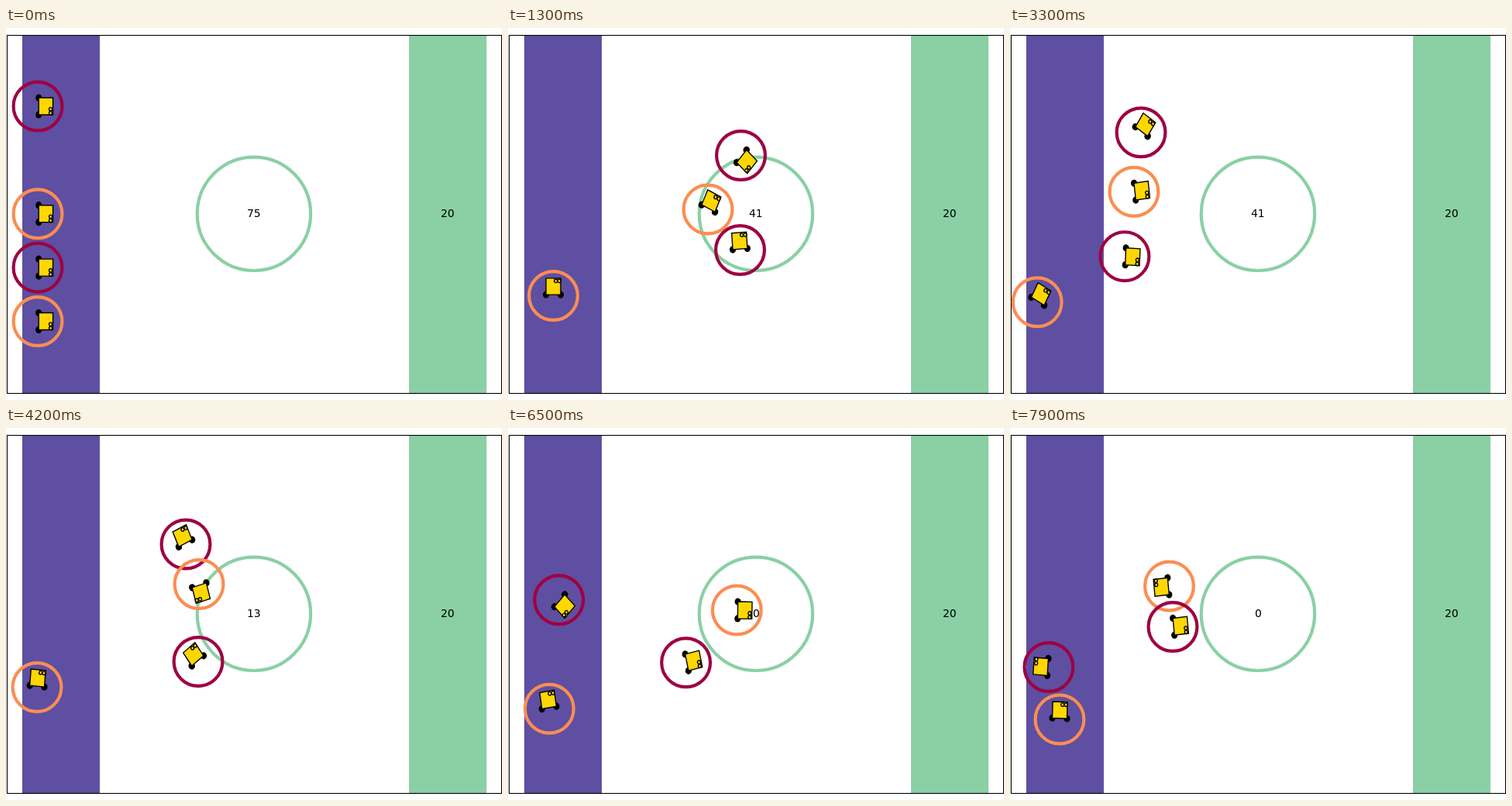
An HTML page that plays this animation: 640x480 px, repeating every 8 s.

```html
<!DOCTYPE html>
<html lang="en">
<head>
<meta charset="utf-8">
<title>Robot foraging</title>
<style>
  html, body { margin: 0; width: 100%; height: 100%; overflow: hidden; background: #fff; }
  svg { display: block; width: 640px; height: 480px; }
  text { font: 13.89px "DejaVu Sans", sans-serif; }
  .robot * { stroke: #000; stroke-width: 1.39; vector-effect: non-scaling-stroke; }
  .ring { fill: none; stroke-width: 4.17; }
</style>
</head>
<body>
<svg viewBox="0 0 640 480">
  <rect x="21" y="9.5" width="100" height="462" fill="#5e4fa2"/>
  <rect x="520" y="9.5" width="100" height="462" fill="#8ad0a4"/>
  <rect x="1.5" y="9.5" width="638" height="462" fill="none" stroke="#000" stroke-width="1.1"/>
  <circle class="ring" cx="319.9" cy="239.8" r="73.2" stroke="#8ad0a4"/>
  <g id="robots"></g>
  <g id="rings"></g>
  <text id="stock" y="244"></text>
  <text id="goal" y="244"></text>
</svg>
<script>
const LOOP = 8000, STEP = 100;
const SCALE_X = 199.5, SCALE_Y = 231;       // pixels per metre
const TURN_MS = 350, SHUFFLE_METRES = 0.42;
const CRIMSON = '#9e0142', ORANGE = '#fc8d52';

// Key poses: [time, x, y, heading in degrees clockwise from +x]
const robots = [
  { color: CRIMSON, stops: [
    [0, 41, 101, 0], [1300, 300.5, 164.5, 42], [2400, 126.5, 232, 162], [3600, 192, 109, -25],
    [4200, 232, 150, -115], [5500, 78, 184, 182], [6500, 65.7, 221.8, 44], [7900, 50, 308.5, 184]] },
  { color: ORANGE, stops: [
    [0, 41, 239.7, 0], [1300, 258, 234, -65], [2400, 74.5, 226, -159], [4200, 249, 201.5, 74],
    [5100, 115, 237, 165], [5500, 153.5, 237, 0], [6500, 295.3, 235, 1], [7900, 205.5, 204, 174]] },
  { color: CRIMSON, stops: [
    [0, 41, 309.1, 0], [1300, 299.5, 286.5, -94], [2400, 58, 291, 180], [4200, 248, 301.5, -127],
    [5150, 82, 300, -170], [5500, 90.3, 299, -8], [6500, 229.6, 302.8, -13], [7900, 210, 256.5, -6]] },
  { color: ORANGE, stops: [
    [0, 41, 378.5, 0], [1300, 58.5, 345.5, -90], [2400, 32, 366, -38], [4200, 40, 334.5, -85],
    [5500, 57.5, 326, -150], [6500, 53.3, 362.2, -99], [7900, 64, 376, -88]] }
];
const stockLevels = [[0, 75], [1100, 41], [3900, 13], [6500, 0]];

const byId = id => document.getElementById(id);
const smooth = u => u <= 0 ? 0 : u >= 1 ? 1 : u * u * (3 - 2 * u);
const nearestAngle = (angle, from) => angle - 360 * Math.round((angle - from) / 360);

function add(parent, tag, attrs) {
  const el = document.createElementNS('http://www.w3.org/2000/svg', tag);
  for (const key in attrs) el.setAttribute(key, attrs[key]);
  return parent.appendChild(el);
}

// Robot body in metres, facing +x
function buildRobot(robot) {
  robot.body = add(byId('robots'), 'g', { class: 'robot' });
  for (const side of [-1, 1])
    add(robot.body, 'circle', { cx: .006, cy: side * .0475, r: .017, fill: '#000' });
  add(robot.body, 'rect', { x: .006, y: -.0475, width: .092, height: .095, fill: '#ffd700' });
  for (const cy of [.016, .038])
    add(robot.body, 'circle', { cx: .083, cy, r: .01, fill: '#ffd700' });
  robot.ring = add(byId('rings'), 'circle', { class: 'ring', r: 31.4, stroke: robot.color });
}

// Wheels only roll along the heading, so project the mean velocity onto it
function velocity(stops, i) {
  const a = stops[Math.max(i - 1, 0)], b = stops[Math.min(i + 1, stops.length - 1)];
  const angle = stops[i][3] * Math.PI / 180, cos = Math.cos(angle), sin = Math.sin(angle);
  const speed = ((b[1] - a[1]) / SCALE_X * cos + (b[2] - a[2]) / SCALE_Y * sin) / (b[0] - a[0]);
  return [speed * cos * SCALE_X, speed * sin * SCALE_Y];
}

// Short moves blend the headings; long ones turn, face the way they go, and turn again
function headingAt(a, b, t) {
  const dx = (b[1] - a[1]) / SCALE_X, dy = (b[2] - a[2]) / SCALE_Y;
  if (Math.hypot(dx, dy) < SHUFFLE_METRES)
    return a[3] + (nearestAngle(b[3], a[3]) - a[3]) * smooth((t - a[0]) / (b[0] - a[0]));
  const cruise = nearestAngle(Math.atan2(dy, dx) * 180 / Math.PI, a[3]);
  return a[3] + (cruise - a[3]) * smooth((t - a[0]) / TURN_MS)
    + (nearestAngle(b[3], cruise) - cruise) * smooth(1 - (b[0] - t) / TURN_MS);
}

function poseAt(stops, t) {
  const next = Math.max(1, stops.findIndex(stop => stop[0] >= t));
  const a = stops[next - 1], b = stops[next], span = b[0] - a[0], u = (t - a[0]) / span;
  const va = velocity(stops, next - 1), vb = velocity(stops, next);
  const [x, y] = [0, 1].map(k => a[k + 1] + (b[k + 1] - a[k + 1]) * smooth(u)
    + span * u * (1 - u) * ((1 - u) * va[k] - u * vb[k]));
  return { x, y, heading: headingAt(a, b, t) };
}

// Centres a number, starting on a whole pixel
function label(id, center, value) {
  const width = 8.84 * String(value).length;
  byId(id).setAttribute('x', Math.round(center - width / 2));
  byId(id).textContent = value;
}

function render(time) {
  const t = Math.floor(time % LOOP / STEP) * STEP;
  for (const { stops, body, ring } of robots) {
    const { x, y, heading } = poseAt(stops, t);
    body.setAttribute('transform',
      `translate(${x} ${y}) scale(${SCALE_X} ${SCALE_Y}) rotate(${heading})`);
    ring.setAttribute('cx', x);
    ring.setAttribute('cy', y);
  }
  label('stock', 320.2, stockLevels.filter(([start]) => start <= t).pop()[1]);
}

robots.forEach(buildRobot);
label('goal', 569.8, 20);
const start = performance.now();
function tick() {
  render(performance.now() - start);
  requestAnimationFrame(tick);
}
tick();
</script>
</body>
</html>
```
